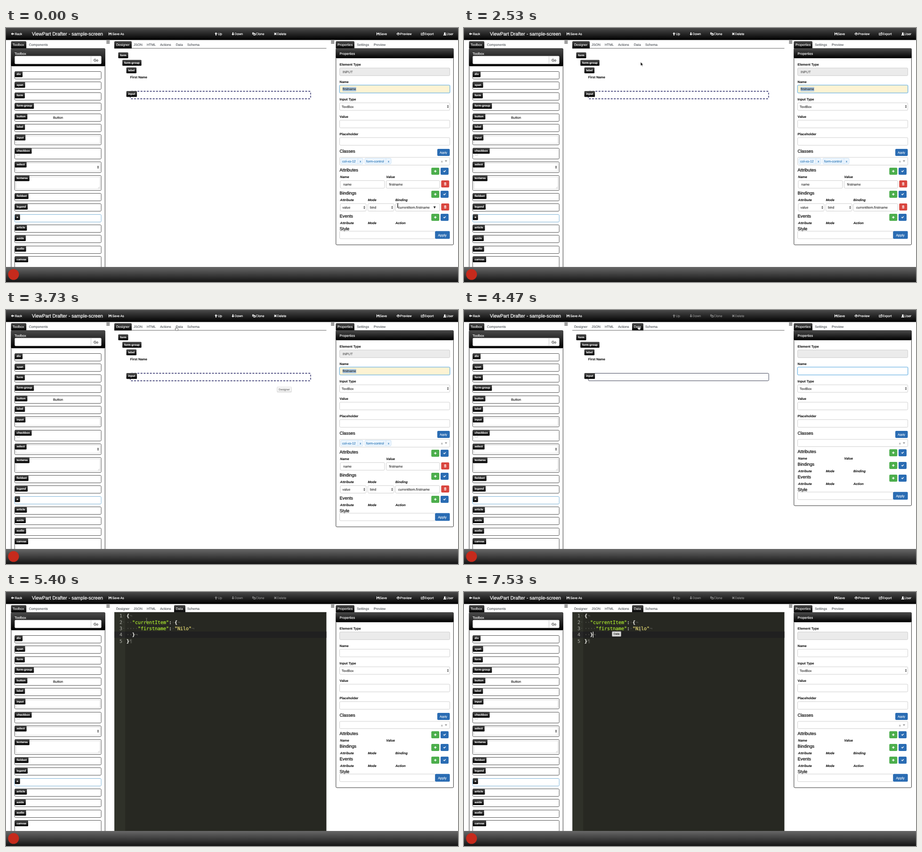
Animation of 960x540 px, one loop 8000 ms. Source, as an HTML page:

```html
<!DOCTYPE html>
<html lang="en">
<head>
<meta charset="utf-8">
<title>Screen designer</title>
<style>
  html, body { margin: 0; width: 100%; height: 100%; overflow: hidden; background: #fff; }
  svg { display: block; width: 960px; height: 540px; }
  text { font-family: "Liberation Sans", Arial, sans-serif; white-space: pre; text-rendering: geometricPrecision; }
  .code text { font-family: "DejaVu Sans Mono", monospace; }
</style>
</head>
<body>
<svg id="stage" viewBox="0 0 960 540" xmlns="http://www.w3.org/2000/svg"></svg>
<script>
const LOOP = 8000, FPS = 15;
const BLUE = '#2a6cb3', GREEN = '#4cae4c', RED = '#d9463f';
const stage = document.getElementById('stage');

const rect = (x, y, w, h, fill, extra = '') =>
  `<rect x="${x}" y="${y}" width="${w}" height="${h}" fill="${fill}" ${extra}/>`;
const path = (d, extra = '') => `<path d="${d}" ${extra}/>`;
// y is the optical middle of the line; weight thickens the glyphs a little
const text = (x, y, str, { size = 7.1, color = '#222', weight = 0.1, extra = '' } = {}) =>
  `<text x="${x}" y="${y + size * 0.36}" font-size="${size}" color="${color}" fill="currentColor"
    stroke="currentColor" stroke-width="${weight}" ${extra}>${str}</text>`;
const group = (id, ...parts) => `<g id="${id}">${parts.join('')}</g>`;
const at = (x, y, body) => `<g transform="translate(${x} ${y})">${body}</g>`;

const white = { color: '#fff', weight: 0.15 };
const bold = { size: 7, color: '#111', extra: 'font-weight="bold"' };
const boldItalic = { size: 7, color: '#111', extra: 'font-weight="bold" font-style="italic"' };
const medium = { size: 9.3, color: '#111', weight: 0.28 };
const title = { size: 10.2, color: '#fff', weight: 0.25 };

const box = (x, y, w, h, fill = '#fff', stroke = '#c4c4c4') =>
  rect(x, y, w, h, fill, `rx="2" stroke="${stroke}" stroke-width=".8"`);
const spinner = (x, y) => path(`M${x - 1.7} ${y - .7}h3.4l-1.7 -2.4zM${x - 1.7} ${y + .7}h3.4l-1.7 2.4z`, 'fill="#222"');
const select = (x, y, w, value) => box(x, y, w, 16) + text(x + 4.5, y + 8, value) + spinner(x + w - 4, y + 8);
const widthOf = (str, weight = '') => {
  const ctx = widthOf.ctx ||= document.createElement('canvas').getContext('2d');
  ctx.font = `${weight} 100px "Liberation Sans", Arial, sans-serif`;
  return ctx.measureText(str).width / 100;
};
const badge = (x, y, str) =>
  rect(x, y - 6, widthOf(str, 'bold') * 6.1 + 7.6, 12.5, 'url(#dark)', 'rx="1.5"') +
  text(x + 3.8, y, str, { size: 6.1, color: '#fff', extra: 'font-weight="bold"' });
const tooltip = (id, x, y, str, fill = '#f1f1f1') => {
  const w = widthOf(str) * 5.9 + 6.5;
  return group(id, rect(x - .6, y + 1, w + 1.2, 11, '#000', 'rx="1.5" opacity=".2"'),
    rect(x, y, w, 10.5, fill, 'rx="1" stroke="#aaa" stroke-width=".5"'),
    text(x + 3.2, y + 5.3, str, { size: 5.9 }));
};
const tab = (x, w) => path(`M${x} 43.5v-13.5q0 -2 2 -2h${w - 4}q2 0 2 2v13.5z`, 'fill="url(#dark)"');
const tabLabel = (x, str, color = '#4a4f55') => text(x, 35.5, str, { color });
const burger = x => [27.5, 30, 32.5].map(y => rect(x, y - .7, 7, 1.4, '#555')).join('');

// Icons are drawn around 0,0
const icons = {
  left: 'M-3.2 0l3 -3v2h3.4v2h-3.4v2z',
  up: 'M0 -3.2l3 3h-2v3.4h-2v-3.4h-2z',
  down: 'M0 3.2l3 -3h-2v-3.4h-2v3.4h-2z',
  save: 'M-3 -3h4.6l1.4 1.4v4.6h-6zM-1.6 -3v2h2.6v-2zM-1.6 3v-2.4h3.2v2.4z',
  clone: 'M-3.3 -3h3v1.5h-1.5v3h-1.5zM-1 -1.8h2.4l2 1.6v3.4h-4.4zM0 .2h2v2h-2z',
  cross: 'M-2.8 -1.6l1.2 -1.2 1.6 1.6 1.6 -1.6 1.2 1.2 -1.6 1.6 1.6 1.6 -1.2 1.2 -1.6 -1.6 -1.6 1.6 -1.2 -1.2 1.6 -1.6z',
  eye: 'M-3.8 0q3.8 -5.4 7.6 0q-3.8 5.4 -7.6 0zM-2.4 0q.6 1.6 2.4 1.7q1.8 -.1 2.4 -1.7q-.7 -1.2 -1.4 -1.5q.5 2 -1 2t-1 -2q-.8 .4 -1.4 1.5z',
  export: 'M-3.2 -2h2.4v1.1h-1.3v2.8h4v-1.4h1.1v2.5h-6.2zM.2 -3h3.1v3.1l-1 -1 -2 2 -1 -1 2 -2z',
  user: 'M0 -3.2q1.8 0 1.8 2t-1 2q2.6 .6 2.6 2.4h-6.8q0 -1.8 2.6 -2.4q-1 0 -1 -2t1.8 -2z',
  plus: 'M-.8 -2.6h1.6v1.8h1.8v1.6h-1.8v1.8h-1.6v-1.8h-1.8v-1.6h1.8z',
  check: 'M-2.8 0l1 -1 1.2 1.2 2.4 -2.4 1 1 -3.4 3.4z',
  trash: 'M-2.4 -2.4h1.4v-.8h2v.8h1.4v1h-4.8zM-2 -1h4v4h-4zM-1.1 -.3v2.5h.5v-2.5zM-.25 -.3v2.5h.5v-2.5zM.6 -.3v2.5h.5v-2.5z'
};
const icon = (name, x, y, fill = '#fff') =>
  at(x, y, path(icons[name], `fill="${fill}" fill-rule="evenodd"`));
const button = (name, x, y, color, w = 17) =>
  rect(x, y, w, 15, color, 'rx="2"') + icon(name, x + w / 2, y + 7.5);
const menuItem = (name, x, str, gap = 4) =>
  icon(name, x, 12.5, 'currentColor') +
  text(x + gap, 12.5, str, { size: 6.9, color: 'inherit', weight: 0.2 });

function bars() {
  return rect(0, 0, 960, 25.5, 'url(#dark)') + rect(0, 508, 960, 32, 'url(#footer)') +
    '<circle cx="16" cy="524" r="11.5" fill="#c62a1c"/>' +
    group('menu', menuItem('left', 14, 'Back', 5), menuItem('save', 221, 'Save As', 4.5),
      menuItem('save', 790, 'Save', 3.5), menuItem('eye', 833, 'Preview'),
      menuItem('export', 884.5, 'Export'), menuItem('user', 932, 'User', 3.5)) +
    group('edit', menuItem('up', 446, 'Up'), menuItem('down', 482, 'Down', 3.5),
      menuItem('clone', 526.5, 'Clone'), menuItem('cross', 572, 'Delete', 3.5)) +
    text(55, 12.5, 'ViewPart Drafter', title) + text(133, 12.5, '- sample-screen', title);
}

function toolbox() {
  const tall = { input: 28.3, checkbox: 29.2, select: 29, textarea: 38 };
  const names = 'div span form form-group button label input checkbox select textarea fieldset legend a article aside audio canvas'.split(' ');
  const inner = (y, h) => rect(21.5, y + 3, 178, h - 6, '#fff', 'stroke="#ccc" stroke-width=".7"');
  let y = 92, items = '';
  for (const name of names) {
    const pitch = tall[name] || 22.4;
    const top = Math.round(y) + .5, h = name === 'canvas' ? 40 : Math.round(pitch - 6);
    items += rect(18.5, top, 183.7, h, '#fff', `rx="2" stroke="${name === 'a' ? '#7fb4d8' : '#555'}" stroke-width="1"`);
    if (name === 'button') items += text(100, y + 8.4, 'Button', { size: 7.3, color: '#111' });
    if (['input', 'select', 'textarea'].includes(name)) items += inner(top, h);
    if (name === 'checkbox') items += rect(23, y + 9.5, 6.5, 6.5, '#fff', 'rx="1" stroke="#bbb" stroke-width=".7"');
    if (name === 'select') items += spinner(195.5, y + 12);
    if (name === 'textarea') items += path(`M195.5 ${y + 28}l3 -3M197.5 ${y + 28}l1 -1`, 'stroke="#888" stroke-width=".5"');
    items += badge(18.8, y + 6.1, name);
    y += pitch;
  }
  return tab(10.7, 32.5) + tabLabel(14, 'Toolbox', '#fff') + tabLabel(48.7, 'Components') + burger(213.3) +
    rect(11, 43.5, 199.3, 480, '#fff', 'rx="2" stroke="#333" stroke-width="1"') +
    rect(10.6, 43.2, 200.1, 38, 'url(#dark)', 'rx="2"') + text(18.3, 54, 'Toolbox', white) +
    rect(18.5, 59.5, 184, 17, '#fff', 'rx="2"') + path('M180.5 59.5v17', 'stroke="#bbb" stroke-width=".8"') +
    text(186, 68, 'Go', { size: 7.4, color: '#111' }) + items;
}

function center() {
  const labels = [[234, 'Designer'], [271, 'JSON'], [299, 'HTML'], [327.3, 'Actions'], [360.7, 'Data'], [385, 'Schema']];
  return group('designerTab', tab(230, 37)) + group('dataTab', tab(357, 24)) +
    labels.map(([x, s]) => group('tab' + s, tabLabel(x, s, 'inherit'))).join('') + burger(690.3) +
    path('M230 43.2h450.5', 'stroke="#555" stroke-width=".9"') +
    badge(238.4, 57.7, 'form') + badge(247.2, 73.7, 'form-group') + badge(255.6, 89.8, 'label') +
    text(263.8, 104, 'First Name', bold) +
    group('picked', rect(264, 134.5, 383, 16, '#fff', 'rx="2" stroke="#1c1c5e" stroke-width="1.3" stroke-dasharray="4 2.6"')) +
    group('unpicked', rect(264, 134.5, 383.3, 16, '#fff', 'rx="2" stroke="#44485c" stroke-width="1"')) +
    badge(255.6, 140, 'input');
}

function editor() {
  const dim = s => `<tspan color="#55564f">${s}</tspan>`;
  const key = s => `<tspan color="#a6e22e">"${s}"</tspan>`;
  const str = s => `<tspan color="#e6db74">"${s}"</tspan>`;
  const brace = s => `<tspan font-weight="bold">${s}</tspan>`;
  const lines = [
    brace('{') + dim('¬'),
    dim('··') + key('currentItem') + ':' + dim('·') + brace('{') + dim('¬'),
    dim('····') + key('firstname') + ':' + dim('·') + str('Nilo') + dim('¬'),
    dim('··') + brace('}') + dim('¬'),
    brace('}') + dim('¶')
  ];
  const rows = lines.map((line, i) => {
    const y = 50.6 + i * 13.4;
    return text(247, y, i + 1, { size: 10, color: '#a5a69f', extra: 'text-anchor="end"' }) +
      (i < 3 ? rect(249.5, y - .6, 1, 1, '#777') : '') +
      text(256, y, line, { size: 9.97, color: '#f8f8f2', weight: 0.25 });
  }).join('');
  return `<g id="editor" class="code">` + rect(230.4, 43, 450.1, 466, '#272822') + rect(230.4, 43, 22.9, 466, '#2f3129') +
    rect(230.4, 84, 22.9, 13.4, '#272727') + rect(253.3, 84, 427.2, 13.4, '#202020') + rows +
    group('caret', rect(273.7, 84.4, 1.2, 12.6, '#f8f8f0')) + '</g>';
}

function properties(filled) {
  const label = (y, s) => text(708.6, y, s, bold);
  const field = y => box(708.6, y, 234, 16.3);
  const nameField = fill => rect(707.4, 120.4, 236.4, 18.7, '#b9dcf5', 'rx="3"') + box(708.6, 121.6, 234, 16.3, fill, '#59a7dc');
  const tag = (x, w, s) => box(x, 277, w, 12, '#edf6ff', '#c2dcf2') + path(`M${x + w - 11} 277v12`, 'stroke="#c2dcf2" stroke-width=".7"') +
    text(x + 3, 283, s, { color: '#1f6fb0' }) + text(x + w - 7.3, 283, 'x', { color: '#1f6fb0' });
  const heads = (y, pairs) => pairs.map(([x, s]) => text(x, y, s, boldItalic)).join('');
  const section = (y, name, ...pairs) => text(708.6, y, name, medium) + button('plus', 903.3, y - 5, GREEN) +
    button('check', 923, y - 5, BLUE) + heads(y + 14.5, pairs);
  const pitch = filled ? 49 : 27, y0 = filled ? 302 : 301;
  const y1 = y0 + pitch, y2 = y1 + pitch, y3 = y2 + 27;
  let out = rect(700.8, 43.5, 249.6, y3 - 9.5, '#fff', 'rx="2" stroke="#333" stroke-width="1"') +
    rect(700.5, 43.2, 250.2, 21, 'url(#dark)', 'rx="2"') + text(708.6, 54, 'Properties', white) +
    label(77, 'Element Type') + box(708.6, 85, 234, 16.3, '#ebebeb') +
    label(114, 'Name') + label(151, 'Input Type') + select(708.6, 159, 234, 'TextBox') +
    label(188, 'Value') + field(196) + label(225, 'Placeholder') + field(233) +
    text(708.6, 262, 'Classes', medium) + rect(916, 257, 26.5, 15, BLUE, 'rx="2"') +
    text(921.2, 264.5, 'Apply', { size: 6.3, color: '#fff' }) +
    box(708.6, 275, 234, filled ? 16.5 : 15.5) + text(924, 283, 'x', { color: '#777' }) + path('M932 281.5h5l-2.5 3z', 'fill="#888"');
  out += filled
    ? nameField('#fdf3d3') + rect(714.8, 125.6, 29, 9, '#a7c3dc') + text(715, 130, 'firstname', { size: 6.9 }) +
      text(715, 93, 'INPUT', { color: '#555' }) + tag(711, 47.3, 'col-xs-12') + tag(762, 56, 'form-control')
    : field(121.6) + group('focus', nameField('#fff'));
  out += section(y0, 'Attributes', [709.6, 'Name'], [807.5, 'Value']) +
    section(y1, 'Bindings', [709.6, 'Attribute'], [768.4, 'Mode'], [827, 'Binding']) +
    section(y2, 'Events', [709.6, 'Attribute'], [768.4, 'Mode'], [827, 'Action']);
  if (filled) {
    out += box(710, 324.3, 94, 16.3) + text(716.3, 332.5, 'name') + box(807.7, 324.3, 113.5, 16.3) + text(813.5, 332.5, 'firstname') +
      button('trash', 924.3, 324, RED) + select(710, 373.3, 55, 'value') + select(768.6, 373.3, 55.5, 'bind') +
      box(827.2, 373.3, 94, 16) + text(833, 381.5, 'currentItem.firstname') + button('trash', 924.3, 373, RED) +
      group('listArrow', path('M907.8 379.3h5l-2.5 4.6z', 'fill="#222"'));
  }
  return out + text(708.6, y3, 'Style', medium) + box(708.6, y3 + 5, 203, 16) +
    rect(911.3, y3 + 4.7, 31.3, 16.5, BLUE, 'rx="2"') + text(917.5, y3 + 13, 'Apply', { size: 7.3, color: '#fff' });
}

const cursors =
  group('arrow', path('M0 0v7.6l1.8 -1.6 1.2 2.8 1.3 -.6 -1.2 -2.7h2.4z', 'fill="#111" stroke="#fff" stroke-width=".5"')) +
  group('beam', path('M-1.6 -4.4q1.6 0 1.6 1v6.8q0 1 -1.6 1M1.6 -4.4q-1.6 0 -1.6 1v6.8q0 1 1.6 1M-.8 .9h1.6', 'fill="none" stroke="currentColor" stroke-width=".8"')) +
  group('hand', path('M-.9 0q.9 -1 1.7 0v2.8l2.6 .7q.8 .4 .6 1.4l-.7 3h-3.7l-2.6 -3.4q.2 -1.2 1.3 -.5l.8 .6z', 'fill="#fff" stroke="#222" stroke-width=".6"'));

const gradient = (id, top, bottom) => `<linearGradient id="${id}" x2="0" y2="1">
  <stop stop-color="${top}"/><stop offset="1" stop-color="${bottom}"/></linearGradient>`;

stage.innerHTML = `<defs>${gradient('dark', '#4a4a4a', '#000')}${gradient('footer', '#686868', '#141414')}</defs>` +
  rect(0, 0, 960, 540, '#fff') + toolbox() + center() + editor() +
  tab(700.5, 39.5) + tabLabel(704, 'Properties', '#fff') + tabLabel(745.3, 'Settings') + tabLabel(781, 'Preview') +
  group('filledPanel', properties(true)) + group('emptyPanel', properties(false)) + bars() +
  tooltip('tipProperties', 832, 386.3, 'Properties') + tooltip('tipDesigner', 576, 163.3, 'Designer') +
  tooltip('tipData', 314.5, 84, 'Data', '#d6d6d6') + group('cursor', cursors);

const el = id => document.getElementById(id);
const show = (id, on) => el(id).setAttribute('visibility', on ? 'visible' : 'hidden');
const tint = (id, color) => el(id).setAttribute('color', color);
const fade = (id, amount) => el(id).setAttribute('opacity', Math.min(1, Math.max(0, amount)));
tint('menu', '#fff');
for (const name of ['JSON', 'HTML', 'Actions', 'Schema']) tint('tab' + name, '#4a4f55');

// Pointer route: time, x, y
const route = [
  [0, 832, 377.5], [267, 832, 377.5], [600, 882, 381.5], [867, 911, 383], [1067, 902, 381.5], [1200, 901, 381.5],
  [1733, 901, 381.5], [1800, 889, 379.5], [2000, 770, 290], [2267, 576, 155], [2467, 410, 85], [2600, 340, 60],
  [2933, 312, 50], [3067, 314, 46], [3467, 345, 39], [3867, 370, 34.3], [3933, 371, 34], [4733, 371, 34],
  [5200, 316, 54], [5600, 281, 66], [5667, 280, 66], [5867, 280, 66], [6400, 316, 71], [6467, 315, 75],
  [6600, 315, 75], [7267, 374, 79], [LOOP, 374, 79]
];
function pointer(t) {
  const i = route.findIndex(p => p[0] > t);
  const [t0, x0, y0] = route[i - 1], [t1, x1, y1] = route[i];
  const k = (t - t0) / (t1 - t0);
  return [x0 + (x1 - x0) * k, y0 + (y1 - y0) * k];
}

function draw(time) {
  const t = Math.floor(time * FPS / 1000 + 0.06) * 1000 / FPS % LOOP;
  const cleared = t >= 4460, coding = t >= 4525;
  show('filledPanel', !cleared);
  show('emptyPanel', cleared);
  fade('focus', (4600 - t) / 130);
  show('picked', !cleared);
  show('unpicked', cleared);
  show('designerTab', !cleared);
  show('dataTab', cleared);
  tint('tabDesigner', cleared ? '#4a4f55' : '#fff');
  tint('tabData', cleared ? '#fff' : '#4a4f55');
  tint('edit', cleared ? '#858585' : '#fff');
  show('editor', coding);
  show('caret', coding && (t - 4525) % 1000 < 500);
  show('listArrow', t < 1860);

  show('tipProperties', t > 60 && t < 1990);
  show('tipDesigner', t > 2660 && t < 3930);
  fade('tipDesigner', (3930 - t) / 300);
  show('tipData', t > 6460);

  const [x, y] = pointer(t);
  const hand = y < 43, beam = !hand && (coding || t < 1850);
  show('hand', hand);
  show('beam', beam);
  show('arrow', !hand && !beam);
  tint('cursor', coding ? '#77786f' : '#111');
  el('cursor').setAttribute('transform', `translate(${x} ${y})`);
}

const start = performance.now();
(function tick() {
  draw((performance.now() - start) % LOOP);
  requestAnimationFrame(tick);
})();
</script>
</body>
</html>
```
